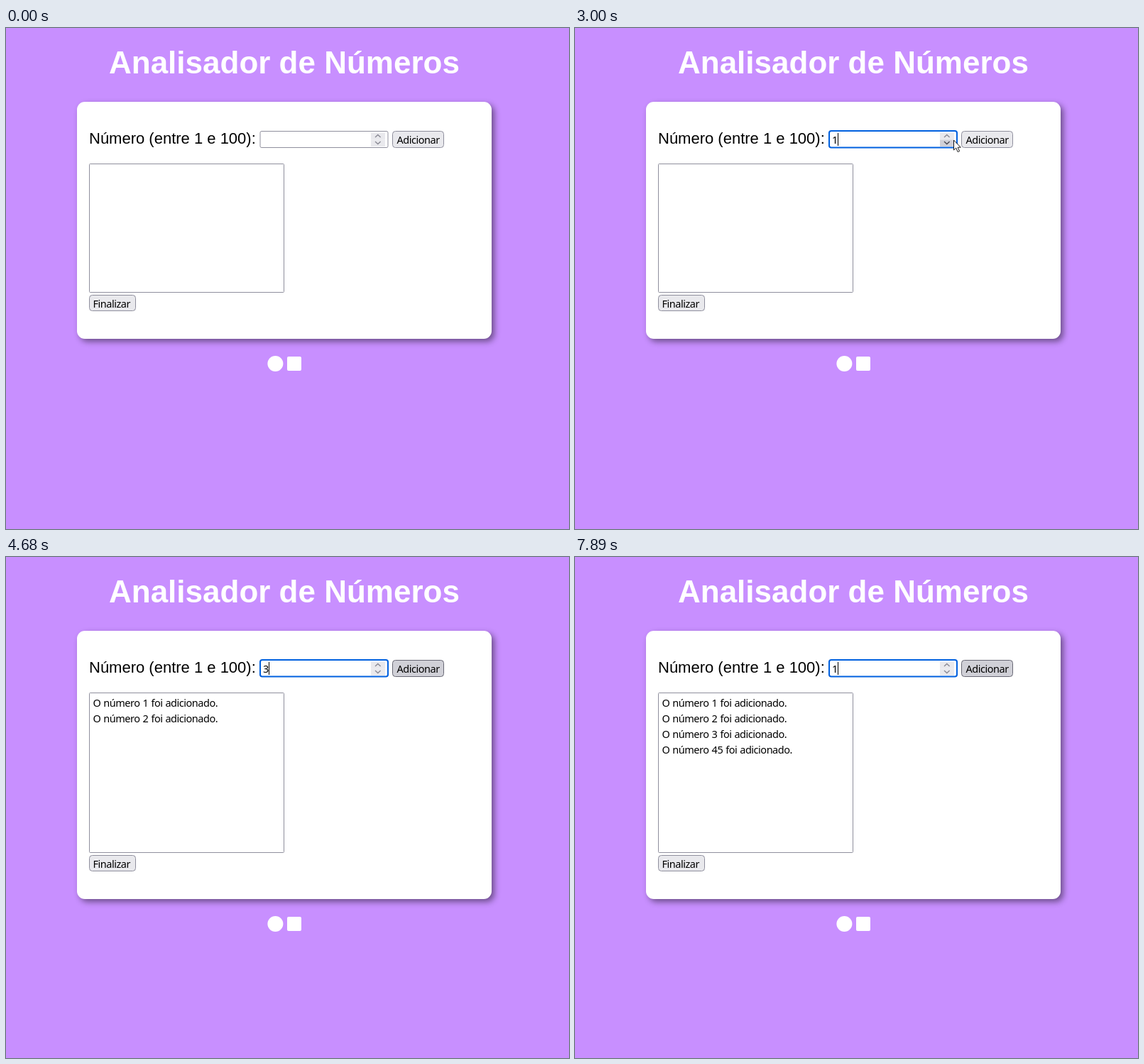
An HTML page that plays this animation: 793x706 px, repeating every 8 s.

```html
<!DOCTYPE html>
<html lang="pt">
<head>
<meta charset="utf-8">
<title>Analisador de Números</title>
<style>
  html, body { margin: 0; height: 100%; overflow: hidden; background: #c88fff; }
  svg { display: block; width: 793px; height: 706px; }
  text { white-space: pre; font: 14.5px "Noto Sans", sans-serif; letter-spacing: -.48px; word-spacing: .7px; }
  .page { font: 22px "Liberation Sans", Arial, sans-serif; letter-spacing: 0; word-spacing: 0; }
  h1, .title { font-size: 44px; font-weight: bold; fill: #fff; }
  .card { fill: #fff; filter: drop-shadow(4.4px 4.4px 4.4px rgba(0, 0, 0, .45)); }
  .box { fill: #fff; stroke: #8f8f9d; }
  .button { fill: #e9e9ed; stroke: #8f8f9d; }
  .button.hover { fill: #d0d0d7; stroke: #676774; }
  .button.active { fill: #b1b1b9; stroke: #484851; }
  .box.hover { stroke: #676774; }
  .spin { fill: #e9e9ed; }
  .spin.hover { fill: #d0d0d7; }
  .chevron { fill: none; stroke: #8b8b96; stroke-width: 1.4; }
  .spin.hover + .chevron { stroke: #4a4a54; }
</style>
</head>
<body>
<svg viewBox="0 0 793 706">
  <rect width="793" height="706" fill="#c88fff"/>
  <text class="page title" x="145" y="64">Analisador de Números</text>
  <rect id="card" class="card" x="100" y="104" width="584" height="334" rx="11"/>

  <text class="page" x="117" y="163">Número (entre 1 e 100):</text>
  <rect id="input" class="box" x="358" y="145.5" width="180" height="23" rx="2"/>
  <rect id="ring" x="358" y="145" width="180" height="23.5" rx="3" fill="none" stroke="#0060df" stroke-width="2"/>
  <rect id="spinUp" class="spin" x="514" y="148" width="20" height="9.5"/>
  <path class="chevron" d="M520 154l3.8-3.6 3.8 3.6"/>
  <rect id="spinDown" class="spin" x="514" y="157.5" width="20" height="9.5"/>
  <path class="chevron" d="M520 160l3.8 3.6 3.8-3.6"/>
  <text id="value" x="362" y="163"></text>
  <path id="caret" d="M362.5 148V166" stroke="#000"/>

  <rect id="add" class="button" x="544.5" y="145.5" width="72" height="23" rx="4"/>
  <text x="550.5" y="163">Adicionar</text>

  <rect id="list" class="box" x="117.5" y="191.5" width="274" height="181" rx="1"/>
  <g id="rows"></g>

  <g id="footer">
    <rect class="button" x="117.5" y="376.5" width="65" height="22" rx="4"/>
    <text x="122.5" y="394">Finalizar</text>
    <circle cx="379.4" cy="473" r="11" fill="#fff"/>
    <rect x="396" y="463" width="20" height="20" rx="2" fill="#fff"/>
  </g>

  <g id="pointer">
    <circle id="halo" r="13" fill="#ff0" fill-opacity=".58"/>
    <path id="beam" d="M-1.5-6.5H.8M2.2-6.5H4.5M1.5-6V8M-1.5 8.5H.8M2.2 8.5H4.5" fill="none" stroke="#333"/>
    <path id="arrow" d="M0 0V14l3.2-3 2.5 5.6 2.4-1.1-2.5-5.3h4.2z" fill="#fff" stroke="#000" stroke-width=".9"/>
  </g>
</svg>
<script>
const LOOP = 8000;
const ui = Object.fromEntries([...document.querySelectorAll('[id]')].map(el => [el.id, el]));

const numbers = [1, 2, 3, 45];
const rows = numbers.map((n, i) => {
  const row = document.createElementNS('http://www.w3.org/2000/svg', 'text');
  row.setAttribute('x', 122.5);
  row.setAttribute('y', 211 + 22 * i);
  row.textContent = `O número ${n} foi adicionado.`;
  return ui.rows.appendChild(row);
});

const type = value => ({ value, caret: true, pointer: false });
const press = { pressed: true, focus: false, pointer: true };
const added = count => ({ count, value: '', pressed: false, focus: true, caret: true });
const show = { pointer: true };
const blink = { caret: false };

const events = [
  [0, { value: '', count: 0, focus: false, caret: false, pressed: false, pointer: false, halo: true }],
  [850, show], [1610, { halo: false }],
  [1670, { focus: true, caret: true }], [2130, blink],
  [2460, type('1')], [2527, show], [3280, press], [3420, added(1)],
  [3950, type('2')], [4280, show], [4350, press], [4420, added(2)],
  [4680, type('3')], [5080, press], [5220, added(3)],
  [5420, type('4')], [5880, type('45')], [6480, blink],
  [6880, show], [6950, press], [7020, added(4)], [7560, blink],
  [7890, type('1')],
];

// Pointer strokes: time, x, y; each stroke is sampled at its own step.
const strokes = [
  { step: 75.5, points: [[850, 737, 250], [1000, 590, 196], [1150, 410, 163], [1300, 320, 155], [1450, 372, 153.5], [1530, 382, 153.5]] },
  { step: 67.5, points: [[2460, 382, 153.5], [2595, 400, 154], [3000, 533.5, 158], [3150, 562, 158.5]] },
];

function pointerAt(time) {
  const { step, points } = strokes[time < 2460 ? 0 : 1];
  const start = points[0][0];
  const t = start + Math.max(0, Math.floor((time - start) / step)) * step;
  const next = points.findIndex(p => p[0] > t);
  if (next < 0) return points.at(-1).slice(1);
  const [t0, x0, y0] = points[next - 1], [t1, x1, y1] = points[next];
  const k = (t - t0) / (t1 - t0);
  return [x0 + (x1 - x0) * k, y0 + (y1 - y0) * k];
}

const visible = (el, on) => el.setAttribute('visibility', on ? 'inherit' : 'hidden');

function draw(time) {
  const s = Object.assign({}, ...events.filter(e => e[0] <= time).map(e => e[1]));
  const [x, y] = pointerAt(time);
  const over = (left, top, right, bottom) =>
    time >= 850 && x >= left && x <= right && y >= top && y <= bottom;
  const overInput = over(358, 145, 538, 169);
  const overText = over(358, 145, 514, 169) || over(117, 144, 352, 168);

  ui.value.textContent = s.value;
  ui.caret.setAttribute('transform', `translate(${8 * s.value.length})`);
  visible(ui.caret, s.focus && s.caret);
  visible(ui.ring, s.focus);
  ui.input.classList.toggle('hover', overInput);
  ui.spinUp.classList.toggle('hover', over(514, 148, 534, 157));
  ui.spinDown.classList.toggle('hover', over(514, 157, 534, 167));
  ui.add.classList.toggle('hover', over(544, 145, 617, 169));
  ui.add.classList.toggle('active', s.pressed);

  const grow = s.count ? 44 : 0;
  ui.card.setAttribute('height', 334 + grow);
  ui.list.setAttribute('height', 181 + grow);
  ui.footer.setAttribute('transform', `translate(0 ${grow})`);
  rows.forEach((row, i) => visible(row, i < s.count));

  visible(ui.pointer, s.pointer);
  ui.pointer.setAttribute('transform', `translate(${x} ${y})`);
  visible(ui.halo, s.halo);
  visible(ui.beam, overText);
  visible(ui.arrow, !overText);
}

function tick() {
  draw(performance.now() % LOOP);
  requestAnimationFrame(tick);
}
tick();
</script>
</body>
</html>
```
